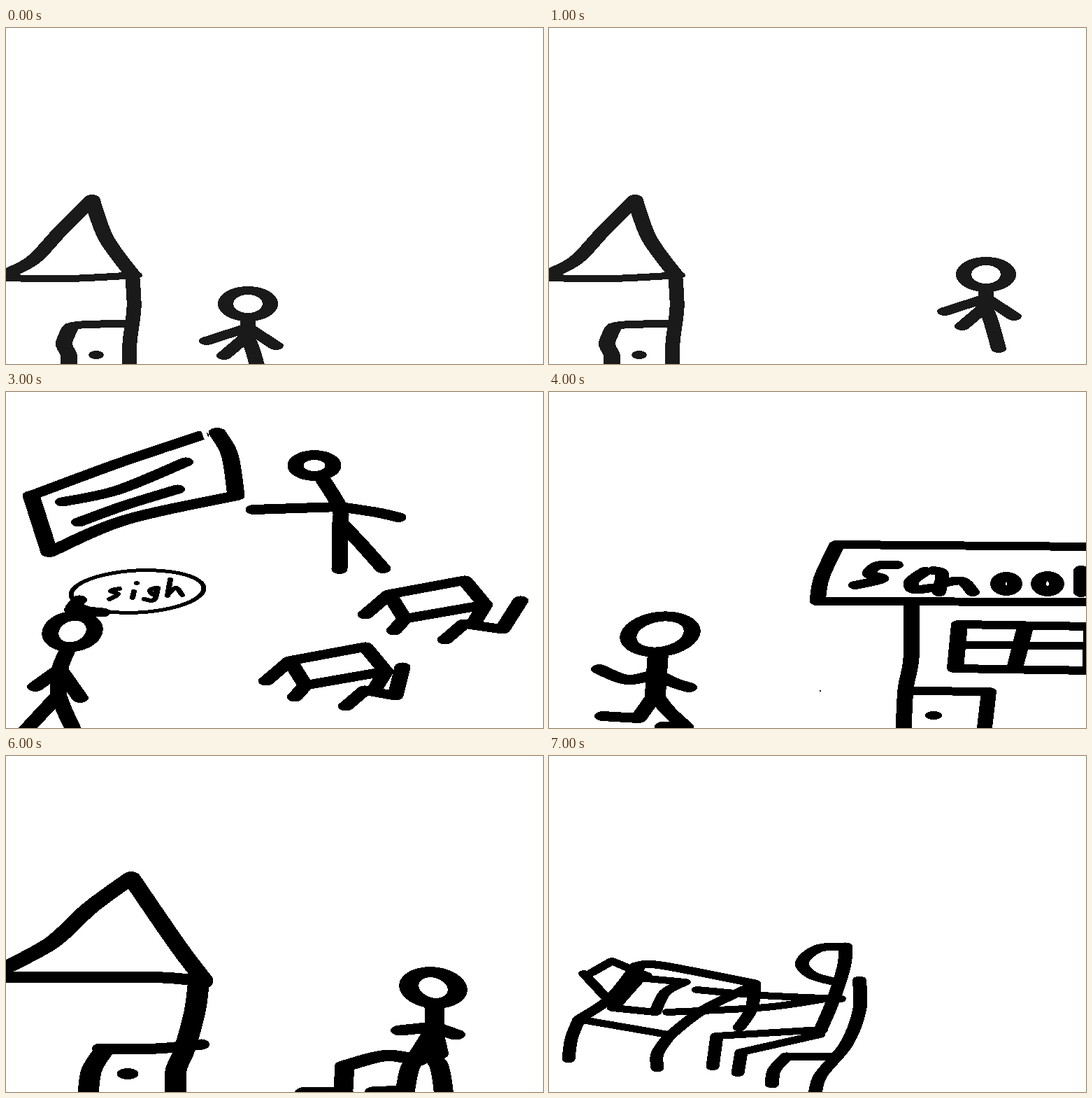
An HTML page for the animation above (8 s loop, 768 by 480 pixels).

```html
<!DOCTYPE html>
<html lang="en">
<head>
<meta charset="utf-8">
<title>School day</title>
<style>
  html, body { margin: 0; width: 100%; height: 100%; overflow: hidden; background: #fff; }
  svg { display: block; width: 100%; height: 100%; }
  path { fill: none; stroke-width: 1; stroke-linecap: round; stroke-linejoin: round; }
  .scene {
    stroke: #000;
    visibility: hidden;
    animation: show 8s step-end infinite;
    animation-delay: calc((var(--slot) - 8) * 1s);
  }
  .soft { stroke: #1a1a1a; }
  .erase { stroke: #fff; }
  @keyframes show {
    0% { visibility: visible; }
    12.5%, 100% { visibility: hidden; }
  }
</style>
</head>
<body>
<svg viewBox="0 0 768 480" shape-rendering="crispEdges"></svg>
<script>
const svg = document.querySelector('svg');
let layer = svg;

function make(tag, attrs, parent) {
  const el = document.createElementNS('http://www.w3.org/2000/svg', tag);
  for (const k in attrs) el.setAttribute(k, attrs[k]);
  return parent.appendChild(el);
}

// Smooth curve through the points; a loop if it ends where it began.
function curve(pts) {
  const n = pts.length;
  const loop = n > 2 && String(pts[0]) === String(pts[n - 1]);
  let d = `M${pts[0]}`;
  if (n === 1) d += `L${pts[0]}`;
  for (let i = 0; i < n - 1; i++) {
    const b = pts[i], c = pts[i + 1];
    const a = pts[i - 1] || (loop ? pts[n - 2] : b);
    const e = pts[i + 2] || (loop ? pts[1] : c);
    const p = b.map((v, k) => v + (c[k] - a[k]) / 6);
    const q = c.map((v, k) => v - (e[k] - b[k]) / 6);
    d += `C${p} ${q} ${c}`;
  }
  return d;
}

// Draws strokes with an elliptical brush, w wide and h high; " / " lifts the brush.
function draw(w, h, strokes, cls = '') {
  const d = strokes.split(' / ').map(s => curve(s.split(' ').map(p => {
    const [x, y] = p.split(',');
    return [x / w, y / h];
  }))).join('');
  make('path', { d, class: cls, transform: `scale(${w} ${h})` }, layer);
}

function oval(x, y, rx, ry, tilt = 0) {
  const t = tilt * Math.PI / 180, pts = [];
  for (let i = 0; i <= 12; i++) {
    const a = (i % 12) * Math.PI / 6, u = rx * Math.cos(a), v = ry * Math.sin(a);
    pts.push([x + u * Math.cos(t) - v * Math.sin(t), y + u * Math.sin(t) + v * Math.cos(t)]
      .map(k => k.toFixed(1)));
  }
  return pts.join(' ');
}

// Stick figure: the spine runs neck, shoulder, hip; arms and legs grow from it.
function person(w, h, head, spine, arms, legs) {
  const [, shoulder, hip] = spine.split(' ');
  draw(w, h, [
    oval(...head), spine,
    ...arms.map(a => `${shoulder} ${a}`),
    ...legs.map(l => `${hip} ${l}`)
  ].join(' / '));
}

// Four-cornered frame, one stroke per side.
function frame(w, h, ...corners) {
  draw(w, h, corners.map((c, i) => `${c} ${corners[(i + 1) % corners.length]}`).join(' / '));
}

function desk(x, y, seat, back) {
  const at = (dx, dy) => `${x + dx},${y + dy}`;
  const farRight = at(137, 15), nearLeft = at(22, 35);
  frame(23, 13, at(0, 0), at(108, -20), farRight, nearLeft);
  draw(23, 13, `${at(0, 0)} ${at(-34, 29)} / ${nearLeft} ${at(7, 52)} / ${farRight} ${at(123, 38)}`);
  draw(23, 13, `${at(80, 65)} ${at(107, 42)} / ${at(107, 42)} ${at(seat, 50)} / ${at(seat, 50)} ${at(back, 9)}`);
}

const parts = {
  home() {
    draw(23, 14, '-6,354 38,332 78,290 123,245 / 123,245 143,300 180,351');
    draw(18, 10, '-6,357 90,358 186,353');
    draw(21, 12, '181,358 183,400 177,450 177,488');
    draw(16, 11, '90,427 108,424 174,422');
    draw(24, 14, '91,430 83,451 90,468 90,490');
    draw(22, 12, '129,467');
  },
  walker() {
    person(22, 12, [346, 394, 32, 19], '346,413 346,428 345,440',
      ['287,447', '386,454'], ['312,468', '354,464 364,500']);
  },
  school() {
    draw(23, 12, '776,221 412,218 / 412,218 390,265 384,299 / 384,299 776,300');
    draw(23, 12, '518,300 518,380 510,425 507,488');
    frame(24, 12, '587,332', '776,335', '775,398', '581,395');
    draw(24, 11, '681,336 666,395 / 588,361 776,363');
    draw(22, 12, '522,427 629,428 / 629,428 622,488');
    draw(24, 12, '550,462');
    draw(20, 12, '497,247 470,248 458,260 476,267 438,276');
    draw(22, 12, '538,256 519,270 522,282 546,280');
    draw(20, 12, '550,255 562,260 558,286 / 560,274 590,270 606,286');
    draw(22, 14, `${oval(654, 274, 12, 10)} / ${oval(713, 274, 13, 11)} / 761,255 761,286`);
  },
  arriving() {
    person(23, 13, [124, 375, 39, 28, -14], '133,405 132,421 130,446',
      ['88,437', '158,433 184,442'], ['106,478 98,488', '148,462 168,490']);
    draw(22, 12, '110,346 140,344 170,354');
  },
  fleeing() {
    const spine = '156,373 154,403 152,432';
    person(24, 14, [159, 346, 46, 25, -8], spine,
      ['112,411 72,396', '178,415 200,422'],
      ['138,452 128,466 / 128,466 77,463', '170,455 195,478 / 195,478 163,478']);
    draw(30, 14, spine);
    draw(2, 2, '388,427');
  },
  lesson() {
    draw(25, 14, '36,148 62,229 / 62,229 170,183 329,148 / 329,148 320,90 302,58');
    draw(22, 13, '36,148 160,102 279,62');
    draw(6, 8, '281,52 288,70', 'erase');
    draw(22, 13, '81,157 160,140 257,100 / 104,186 170,162 245,139');
    person(23, 14, [441, 105, 27, 15], '452,123 477,164 478,186',
      ['354,168', '530,172 561,179'], ['477,253', '505,214 539,252']);
  },
  sleepers() {
    desk(548, 289, 162, 188);
    desk(406, 384, 151, 161);
  },
  sigher() {
    person(24, 14, [95, 342, 32, 22, -10], '90,364 77,396 75,433',
      ['42,421', '106,437'], ['48,462 24,488', '84,456 100,490']);
    draw(22, 13, '96,307 105,297 / 94,311 138,315');
    draw(7, 5, oval(188, 285, 95, 30, -3));
    draw(8, 6, '162,281 150,284 160,289 148,296 / 183,285 181,294 / 187,273');
    draw(8, 6, '217,280 206,283 211,289 217,280 / 217,280 212,297 198,296 / 235,268 231,291 / 231,290 243,280 252,290');
  },
  nearHome() {
    draw(27, 18, '-8,306 65,267 120,217 179,174 / 179,174 245,270 283,320');
    draw(20, 16, '-8,316 210,316 286,323');
    draw(31, 15, '275,328 270,365 255,420 243,450 243,490');
    draw(22, 15, '134,418 215,418 280,412');
    draw(30, 16, '139,422 122,450 117,490');
    draw(31, 16, '174,454');
  },
  runner() {
    person(28, 15, [768, 331, 35, 22, 8], '769,354 769,387 748,424',
      ['721,392', '800,398'], ['734,448 726,490', '775,440 784,490']);
    draw(24, 16, '770,390 778,425');
    draw(28, 16, '746,435 700,428 641,443 / 641,443 640,474 / 640,481 584,481 / 684,480 720,479');
  },
  slump() {
    draw(20, 11, '424,272 385,275 362,295 376,313 410,323 / 424,272 422,300 406,350 388,392');
    draw(16, 10, '417,347 305,342 212,334 / 400,346 310,359 170,366');
    draw(19, 10, '390,391 240,400 / 240,400 234,444 / 386,398 275,423 / 275,423 270,453');
    draw(20, 11, '444,320 444,363 425,412 388,457 380,488 / 412,429 340,429 / 340,429 322,449 319,469');
    draw(19, 11, '124,300 160,299 294,325 / 294,325 290,360 272,388');
    draw(19, 11, '294,327 220,363 172,400 / 172,400 155,425 155,446 / 124,302 88,346 43,376 / 43,376 32,404 28,433');
    draw(16, 10, '48,377 170,398 / 50,311 92,356 / 62,309 90,293 / 90,293 140,314');
    draw(18, 10, '194,323 130,317 / 130,317 92,360 / 92,360 152,366 / 152,366 166,338 194,323 / 128,304 90,354');
  }
};

function scene(slot, names, { cls = '', shift = {} } = {}) {
  const g = make('g', { class: `scene ${cls}`, style: `--slot:${slot}` }, svg);
  for (const name of names) {
    layer = make('g', { transform: `translate(${shift[name] || '0 0'})` }, g);
    parts[name]();
  }
}

scene(0, ['home', 'walker'], { cls: 'soft' });
scene(1, ['home', 'walker'], { cls: 'soft', shift: { walker: '279 -42' } });
scene(2, ['school', 'arriving']);
scene(3, ['lesson', 'sleepers', 'sigher']);
scene(4, ['school', 'fleeing']);
scene(5, ['nearHome', 'runner']);
scene(6, ['nearHome', 'runner'], { shift: { runner: '-157 0' } });
scene(7, ['slump']);
</script>
</body>
</html>
```
